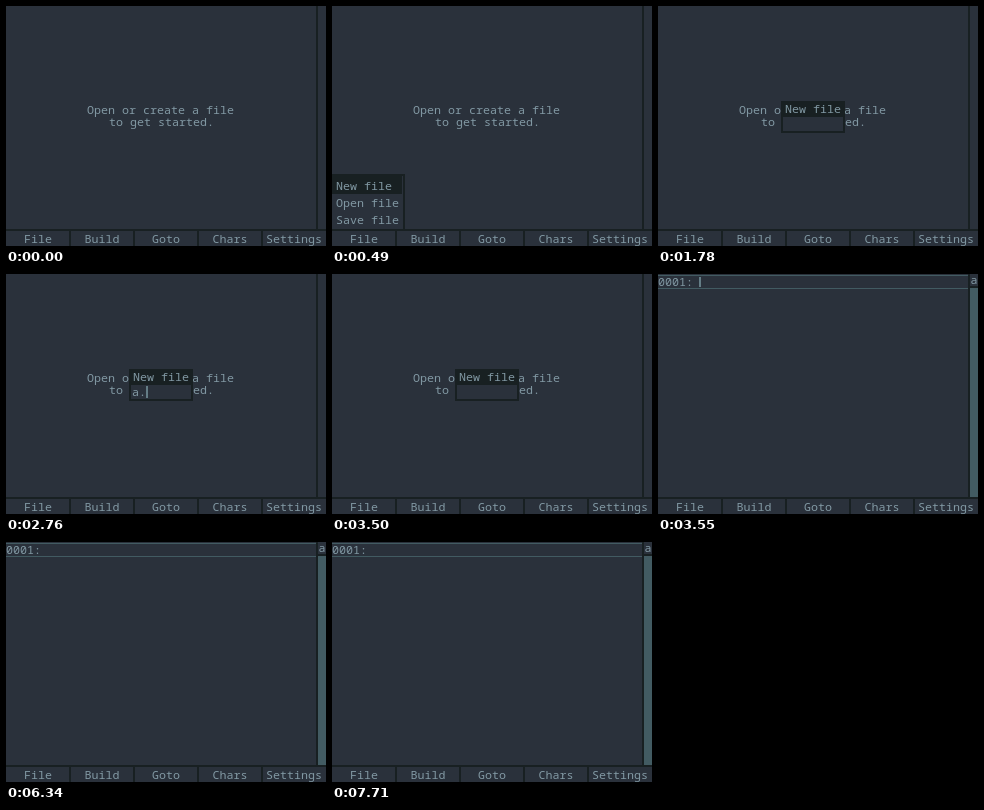
An HTML page for the animation above (8000 ms loop, 320x240 px).

```html
<!DOCTYPE html>
<html lang="en">
<head>
<meta charset="utf-8">
<title>Small code editor</title>
<style>
  html, body { margin: 0; width: 100%; height: 100%; overflow: hidden; background: #2a313b; }
  svg { display: block; width: 100vw; height: 100vh; }
  text {
    font: 300 11.667px "Noto Sans Mono", "Liberation Mono", monospace;
    fill: #8299a4;
    white-space: pre;
  }
</style>
</head>
<body>
<svg id="stage" viewBox="0 0 320 240"></svg>
<script>
const LOOP = 8000;
const BG = '#2a313b', DARK = '#182022', TEAL = '#425b62', CARET = '#647d86';
const CELL = 7;
const stage = document.getElementById('stage');

function add(parent, tag, attrs = {}) {
  const el = document.createElementNS('http://www.w3.org/2000/svg', tag);
  for (const key in attrs) el.setAttribute(key, attrs[key]);
  return parent.appendChild(el);
}
const group = () => add(stage, 'g');
const rect = (parent, x, y, width, height, fill) =>
  add(parent, 'rect', { x, y, width, height, fill });

function label(parent, x, y, str) {
  const el = add(parent, 'text', { x, y });
  el.textContent = str;
  return el;
}
const centred = (parent, cx, y, str) =>
  label(parent, cx - str.length * CELL / 2, y, str);

const show = (el, on) => el.setAttribute('visibility', on ? 'inherit' : 'hidden');

// Window frame and button bar
const frame = group();
rect(frame, 0, 0, 320, 240, BG);
rect(frame, 310, 0, 2, 223, DARK);
const pressed = rect(frame, 0, 225, 63, 15, DARK);
rect(frame, 0, 223, 320, 2, DARK);
['File', 'Build', 'Goto', 'Chars', 'Settings'].forEach((name, i) => {
  if (i) rect(frame, i * 64 - 1, 223, 2, 17, DARK);
  centred(frame, i * 64 + 32, 237, name);
});

// Welcome message
const welcome = group();
centred(welcome, 154.5, 108, 'Open or create a file');
centred(welcome, 155.5, 120, 'to get started.');

// File menu
const menu = group();
rect(menu, 0, 168, 73, 55, DARK);
rect(menu, 0, 170, 71, 53, BG);
rect(menu, 0, 170, 70, 18, DARK);
['New file', 'Open file', 'Save file'].forEach((name, i) =>
  label(menu, 4, 184 + i * 17, name));

// New file dialog
const dialog = group();
rect(dialog, 123, 95, 64, 32, DARK);
rect(dialog, 125, 111, 60, 14, BG);
centred(dialog, 155, 107, 'New file');
const input = label(dialog, 126, 122, '');
const inputCaret = rect(dialog, 126, 112, 2, 12, CARET);

// Editor
const editor = group();
rect(editor, 0, 1, 310, 1, TEAL);
rect(editor, 0, 14, 310, 1, TEAL);
label(editor, 0, 12, '0001:');
const lineCaret = rect(editor, 41, 3, 2, 10, CARET);
label(editor, 312.5, 10, 'a');
rect(editor, 312, 12, 8, 2, DARK);
rect(editor, 312, 14, 8, 209, TEAL);

const FILE_NAME = 'a.c';
const KEYS = [2460, 2760, 3050];
const INPUT_BLINKS = [1480, 1780, 2120];
const LINE_BLINKS = [4290, 4630, 4970, 5320, 5660, 6000, 6340, 6690, 7030, 7370, 7710];
const passed = (times, t) => times.filter(time => t >= time).length;

function draw(t) {
  const between = (from, to) => t >= from && t < to;
  show(pressed, between(400, 490));
  show(menu, between(490, 1090));
  show(dialog, between(1140, 3550));
  show(welcome, t < 3550);
  show(editor, t >= 3550);

  const typed = t < 3500 ? passed(KEYS, t) : 0;
  input.textContent = FILE_NAME.slice(0, typed);
  inputCaret.setAttribute('x', 126 + typed * CELL);
  inputCaret.setAttribute('opacity',
    t < 3500 && (typed > 0 || passed(INPUT_BLINKS, t) % 2) ? 1 : 0);
  lineCaret.setAttribute('opacity', passed(LINE_BLINKS, t) % 2 ? 0 : 1);
}

const start = performance.now();
function tick() {
  draw((performance.now() - start) % LOOP);
  requestAnimationFrame(tick);
}
draw(0);
requestAnimationFrame(tick);
</script>
</body>
</html>
```
